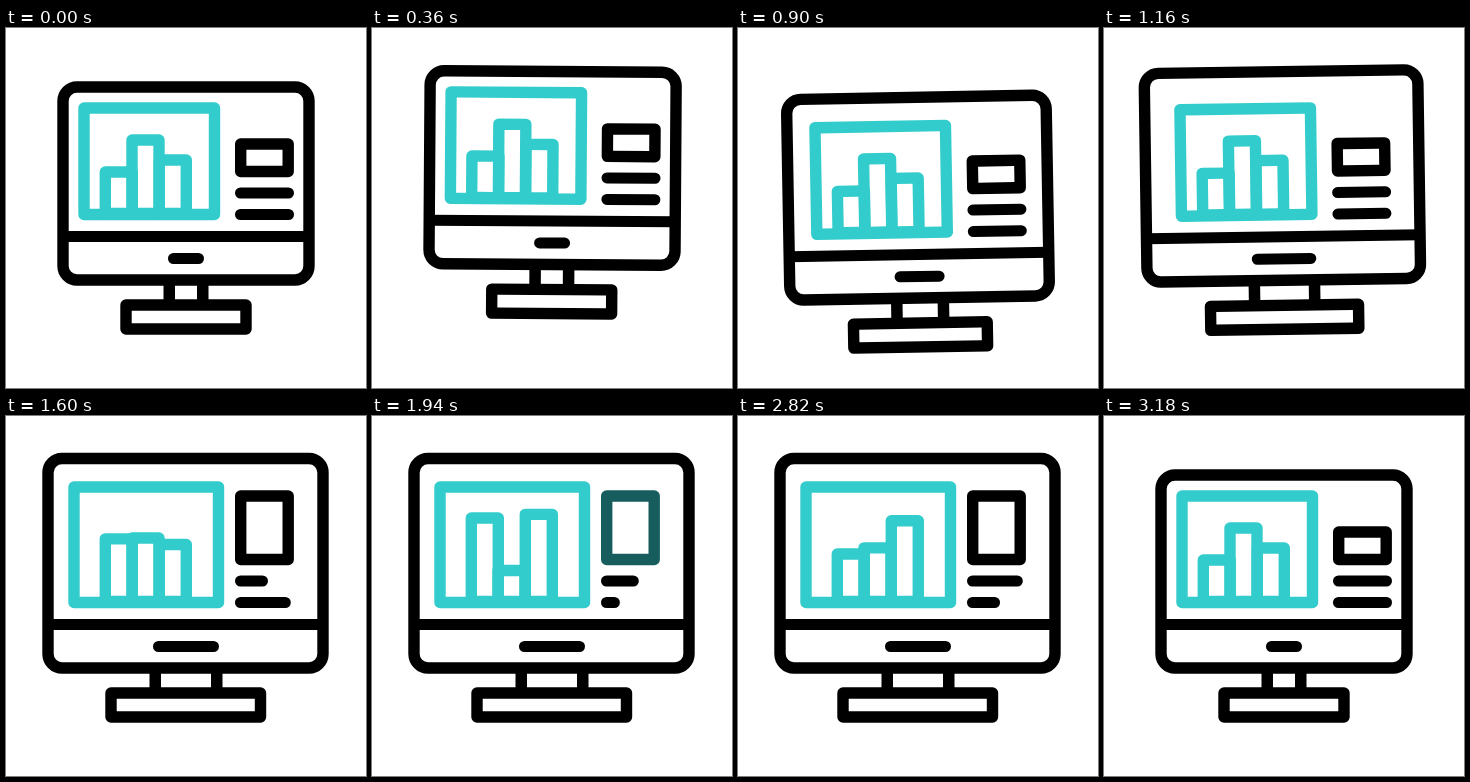
Animation of 360x360 px, one loop 3.2 s. Source, as an HTML page:

```html
<!DOCTYPE html>
<html lang="en">
<head>
<meta charset="utf-8">
<title>Dashboard monitor</title>
<style>
  /* 0 = resting size, 1 = enlarged */
  @property --grow { syntax: "<number>"; inherits: true; initial-value: 0; }
  @property --panel { syntax: "<number>"; inherits: true; initial-value: 0; }
  @property --bar { syntax: "<number>"; inherits: true; initial-value: 0; }
  @property --len { syntax: "<number>"; inherits: true; initial-value: 1; }

  :root {
    --teal: #33cccc;
    --sine: cubic-bezier(.37, 0, .63, 1);
    --out: cubic-bezier(.5, 1, .89, 1);
  }
  html, body { margin: 0; width: 100%; height: 100%; overflow: hidden; background: #fff; }
  svg { display: block; width: 100%; height: 100%; }

  svg, g, rect {
    animation-duration: 3200ms;
    animation-iteration-count: infinite;
    animation-timing-function: var(--sine);
  }
  svg { animation-name: grow, panel; }
  .sway { animation-name: sway; }
  .hop { animation-name: hop, tilt; transform-origin: 180px 180px; }

  rect { fill: none; stroke: #000; stroke-width: 11.4px; stroke-linejoin: round; }
  .solid { fill: #000; stroke: none; }
  .teal { stroke: var(--teal); }

  .screen {
    x: calc(57px - 15px * var(--grow));
    y: calc(59px - 16.5px * var(--grow));
    width: calc(246px + 29px * var(--grow));
    height: calc(193px + 16.5px * var(--grow));
    rx: 14px;
  }
  .divider {
    x: calc(57px - 15px * var(--grow));
    y: 203px;
    width: calc(246px + 29px * var(--grow));
    height: 11px;
  }
  .button {
    x: calc(162px - 15px * var(--grow));
    y: 225px;
    width: calc(36px + 30px * var(--grow));
    height: 11px;
    rx: 5.5px;
  }
  .neck { y: 252px; width: 11.5px; height: 25px; }
  .neck.left { x: calc(157.5px - 14px * var(--grow)); }
  .neck.right { x: calc(191px + 14px * var(--grow)); }
  .base {
    x: calc(120px - 15px * var(--grow));
    y: 277px;
    width: calc(120px + 29.5px * var(--grow));
    height: 24px;
  }

  .frame {
    x: calc(78px - 10px * var(--panel));
    y: calc(80px - 9px * var(--panel));
    width: calc(130.5px + 14px * var(--panel));
    height: calc(106.5px + 9px * var(--panel));
  }
  .bar {
    --move: calc(var(--rise) * var(--bar));
    x: var(--at);
    y: calc(var(--top) - var(--move));
    width: 27px;
    height: calc(185.5px - var(--top) + var(--move));
    animation-name: bar;
  }
  .b1 { --at: 99.3px; --top: 144px; --rise: 42px; }
  .b2 { --at: 126px; --top: 112px; --rise: -45px; animation-delay: 120ms; }
  .b3 { --at: 153.3px; --top: 132px; --rise: 41px; animation-delay: 200ms; }

  .card {
    x: 234.7px;
    y: calc(116px - 36px * var(--panel));
    width: 47.5px;
    height: calc(27.5px + 36px * var(--panel));
    animation-name: tint;
  }
  .line {
    x: 229px;
    width: calc(11px + 48px * var(--len));
    height: 11px;
    rx: 5.5px;
    animation-name: line;
  }
  .l1 { y: 159.5px; }
  .l2 { y: 181px; animation-delay: 153ms; }

  @keyframes hop {
    0%, 6.875% { translate: 0 0; }
    14.53% { translate: 0 -25px; }
    25.8% { translate: 0 20px; }
    37.19%, 100% { translate: 0 0; }
  }
  @keyframes sway {
    0%, 6.875% { translate: 0 0; }
    25% { translate: 3px 0; }
    31.25% { translate: -1.5px 0; }
    40.6%, 100% { translate: 0 0; }
  }
  @keyframes tilt {
    0%, 6.875% { rotate: 0deg; }
    22.5% { rotate: 2.1deg; }
    31.56% { rotate: -2.4deg; }
    39.4%, 100% { rotate: 0deg; }
  }
  @keyframes grow {
    0% { --grow: 0; }
    23.125% { --grow: 0; animation-timing-function: var(--out); }
    41.25%, 90.3% { --grow: 1; }
    99.2%, 100% { --grow: 0; }
  }
  @keyframes panel {
    0%, 38.75% { --panel: 0; }
    48.75%, 90.3% { --panel: 1; }
    99.2%, 100% { --panel: 0; }
  }
  @keyframes bar {
    0%, 40% { --bar: 0; }
    60%, 75% { --bar: 1; }
    92.5%, 100% { --bar: 0; }
  }
  @keyframes line {
    0%, 43.1%, 66.7%, 90.3%, 100% { --len: 1; }
    54.9%, 78.5% { --len: .15; }
  }
  @keyframes tint {
    0%, 56.25% { stroke: #000; }
    65.6%, 78.1% { stroke: var(--teal); }
    87.5%, 100% { stroke: #000; }
  }
</style>
</head>
<body>
<svg viewBox="0 0 360 360">
  <g class="sway">
    <g class="hop">
      <rect class="neck left solid"/>
      <rect class="neck right solid"/>
      <rect class="base"/>
      <rect class="screen"/>
      <rect class="divider solid"/>
      <rect class="button solid"/>
      <rect class="frame teal"/>
      <rect class="bar b1 teal"/>
      <rect class="bar b2 teal"/>
      <rect class="bar b3 teal"/>
      <rect class="card"/>
      <rect class="line l1 solid"/>
      <rect class="line l2 solid"/>
    </g>
  </g>
</svg>
</body>
</html>
```
